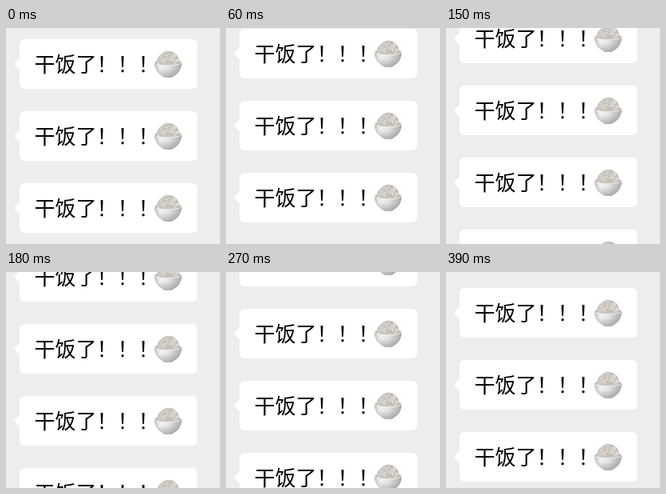
Write an HTML page that moves like this. It is 268 px wide and 270 px high and loops after 420 ms.

```html
<!DOCTYPE html>
<html lang="zh-CN">
<head>
<meta charset="utf-8">
<style>
  html, body { margin: 0; width: 100%; height: 100%; overflow: hidden; background: #ededed; }
  svg { display: block; width: 268px; height: 270px; }
  text { font: 26px "Noto Sans CJK SC", "Noto Sans CJK", sans-serif; }
</style>
</head>
<body>
<svg viewBox="0 0 268 270">
  <defs>
    <linearGradient id="side">
      <stop offset="0" stop-color="#bdbdbd"/>
      <stop offset=".2" stop-color="#f0f0f0"/>
      <stop offset=".5" stop-color="#e6e6e6"/>
      <stop offset="1" stop-color="#a9a9a9"/>
    </linearGradient>
    <linearGradient id="shade" x2="0" y2="1">
      <stop offset=".4" stop-color="#777" stop-opacity="0"/>
      <stop offset="1" stop-color="#777" stop-opacity=".5"/>
    </linearGradient>
    <g id="bubble">
      <rect x="17" y="14" width="222.5" height="62" rx="6" fill="#fff"/>
      <path d="M17.5 37L10.6 44Q9.6 45 10.6 46L17.5 53Z" fill="#fff"/>
      <text x="35.5" y="54.5">干饭了！！！</text>
      <ellipse cx="203" cy="43.5" rx="17" ry="4" fill="#b5b5b5"/>
      <path d="M189.5 44C188 39 191 34.5 194.5 33C197 28.5 207 27 211 31.5C215 33 218 39 216.5 44C210 47.5 196 47.5 189.5 44Z" fill="#cbc7c0"/>
      <g id="rice" stroke-width="1.1" stroke-linecap="round"/>
      <path id="bowl" d="M186 43C189 48 217 48 220 43C220 51 216 57 210 60Q209 62 203 62Q197 62 196 60C190 57 186 51 186 43Z" fill="url(#side)"/>
      <use href="#bowl" style="fill:url(#shade)"/>
      <path d="M186 43C189 48 217 48 220 43C220 51 216 57 210 60Q209 62 203 62Q197 62 196 60C190 57 186 51 186 43Z" fill="url(#shade)"/>
      <path d="M186.3 43.3C189 48.2 217 48.2 219.7 43.3" fill="none" stroke="#f5f5f5" stroke-width=".9"/>
    </g>
  </defs>
  <g id="list"></g>
</svg>
<script>
  const STEP = 30, STEPS = 14, PITCH = 90;
  const list = document.getElementById('list');
  const rice = document.getElementById('rice');

  let seed = 7;
  const random = () => (seed = seed * 16807 % 2147483647) / 2147483647;

  // Short grains scattered over the mound
  const colors = ['#e9e6e0', '#dedad3', '#b5b0a8', '#d6d2ca'];
  let grains = '';
  for (let i = 0; i < 100; i++) {
    const angle = Math.PI * (1 + random()), r = Math.sqrt(random());
    const x = 203 + 12.6 * r * Math.cos(angle), y = 44 + 14 * r * Math.sin(angle);
    const dx = random() * 2 - 1, dy = random() * 2 - 1;
    grains += `<path d="M${x} ${y}l${dx} ${dy}" stroke="${colors[i % 4]}"/>`;
  }
  rice.innerHTML = grains;

  list.innerHTML = [0, 1, 2, 3].map(i => `<use href="#bubble" y="${i * PITCH}"/>`).join('');

  function draw(now) {
    const step = Math.floor(now / STEP) % STEPS;
    list.setAttribute('transform', `translate(0 ${-Math.round(step * PITCH / STEPS)})`);
    requestAnimationFrame(draw);
  }
  draw(performance.now());
</script>
</body>
</html>
```
